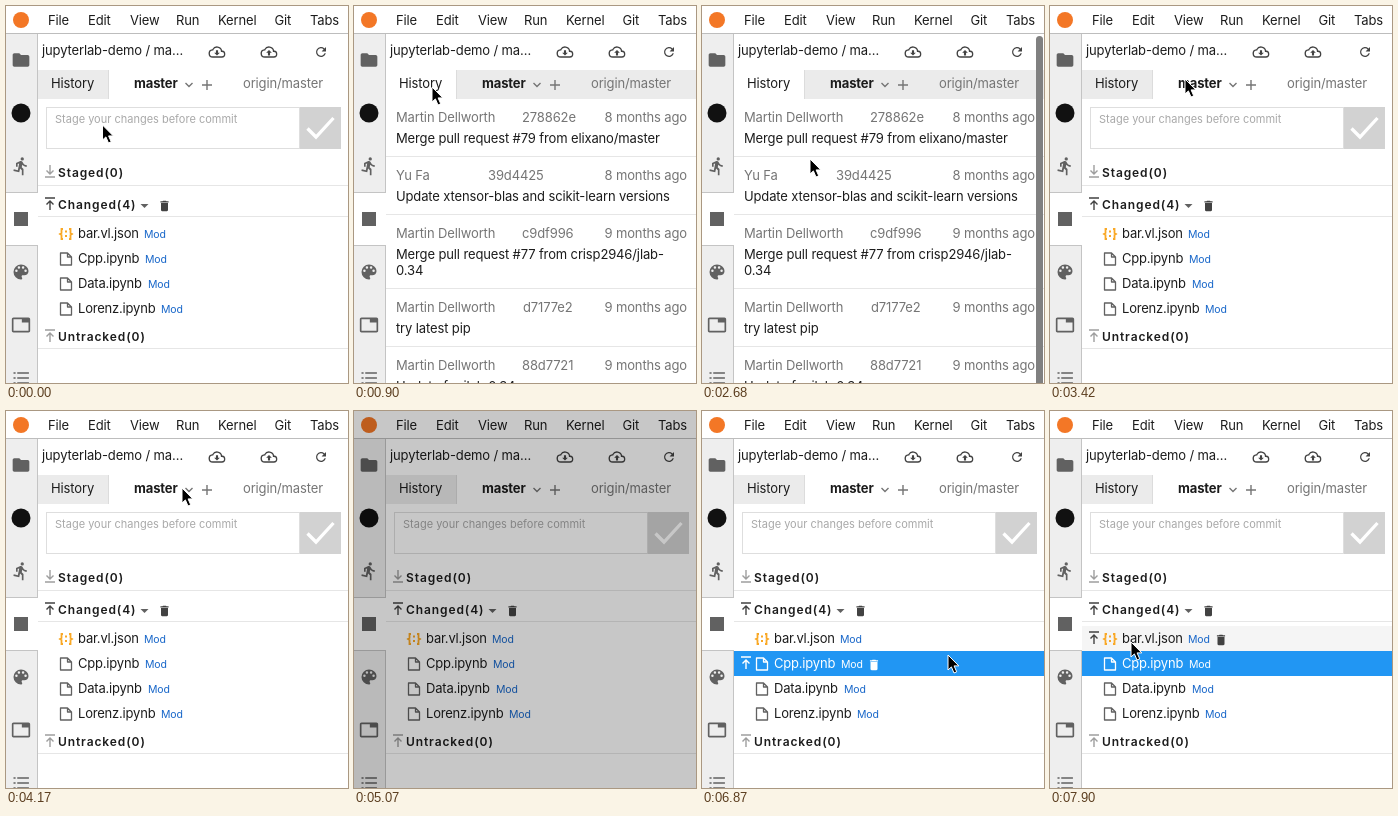
An HTML page that plays this animation: 342x377 px, repeating every 8000 ms.

```html
<!DOCTYPE html>
<html lang="en">
<head>
<meta charset="utf-8">
<title>Version control panel</title>
<style>
  html, body { margin: 0; width: 100%; height: 100%; overflow: hidden; background: #fff; }
  svg { display: block; width: 100vw; height: 100vh; }
  text { font: 13px Inter, "Open Sans", sans-serif; letter-spacing: -.13px; fill: #1c1c1c; white-space: pre; }
  .grey { fill: #757575; }
  .bold { font-weight: 700; }
  .head { font-size: 12px; font-weight: 600; letter-spacing: .9px; }
  .hint { font-size: 11px; letter-spacing: 0; fill: #a9a9a9; }
  .mod { font-size: 10.5px; fill: #1766c9; }
  .name { letter-spacing: -.2px; }
  .bg { fill: #fff; }
  .act { display: none; color: #424242; }
  .hover .bg { fill: #f5f5f5; }
  .hover .act { display: inline; }
  .sel .bg { fill: #2196f3; }
  .sel text { fill: #fff; }
  .sel .doc { stroke: #fff; }
  .sel .act { color: #fff; }
</style>
</head>
<body>
<svg id="stage" viewBox="0 0 342 377" preserveAspectRatio="none"></svg>
<script>
const LOOP = 8000;
const stage = document.getElementById('stage');

const shapes = {
  folder: 'M10 4H4c-1.1 0-2 .9-2 2v12c0 1.1.9 2 2 2h16c1.1 0 2-.9 2-2V8c0-1.1-.9-2-2-2h-8l-2-2z',
  run: 'M13.5 5.5a2 2 0 1 0 0-4a2 2 0 1 0 0 4zM9.9 19.4l1-4.4 2.1 2v6h2v-7.5l-2.1-2 .6-3c1.3 1.5 3.3 2.5 5.5 2.5v-2c-1.9 0-3.5-1-4.3-2.4l-1-1.6c-.4-.6-1-1-1.7-1-.3 0-.5.1-.8.1L6 8.3v4.7h2V9.6l1.8-.7-1.6 8.1-4.9-1-.4 2 7 1.4z',
  palette: 'M12 3a9 9 0 0 0 0 18c.83 0 1.5-.67 1.5-1.5 0-.39-.15-.74-.39-1.01-.23-.26-.38-.61-.38-.99 0-.83.67-1.5 1.5-1.5H16c2.76 0 5-2.24 5-5 0-4.42-4.03-8-9-8z' +
    [[5, 10.5], [8, 6.5], [13, 6.5], [16, 10.5]].map(([x, y]) => `M${x} ${y}a1.5 1.5 0 1 0 3 0a1.5 1.5 0 1 0-3 0z`).join(''),
  tabs: 'M21 3H3c-1.1 0-2 .9-2 2v14c0 1.1.9 2 2 2h18c1.1 0 2-.9 2-2V5c0-1.1-.9-2-2-2zM21 19H3V5h10v4h8z',
  list: [5, 11, 17].map(y => `M3 ${y}h2.5v2h-2.5zM7.5 ${y}h14v2h-14z`).join(''),
  trash: 'M6 19c0 1.1.9 2 2 2h8c1.1 0 2-.9 2-2V7H6zM19 4h-3.5l-1-1h-5l-1 1H5v2h14z',
  refresh: 'M17.65 6.35A8 8 0 1 0 19.73 14h-2.08A6 6 0 1 1 16.22 7.78L13 11h7V4z',
  cloud: 'M19.35 10.04A7.5 7.5 0 0 0 5.35 8.04A6 6 0 0 0 6 20h13a5 5 0 0 0 .35-9.96zM19 18H6a4 4 0 0 1 0-8h.71A5.5 5.5 0 0 1 17.5 11.5v.5H19a3 3 0 0 1 0 6z'
};
const down = 'M10.5 9.5h3V13H16l-4 4-4-4h2.5z';
const up = 'M8 13h2.5v4h3v-4H16l-4-4z';

const text = (x, y, s, cls = '') => `<text x="${x}" y="${y}" class="${cls}">${s}</text>`;
const rect = (x, y, w, h, fill, more = '') => `<rect x="${x}" y="${y}" width="${w}" height="${h}" fill="${fill}" ${more}/>`;
const rule = y => rect(32, y, 310, 1, '#e6e6e6');
const stroke = (d, color, w = 1.3, more = '') => `<path d="${d}" fill="none" stroke="${color}" stroke-width="${w}" ${more}/>`;

// 24-unit icon centred on (cx, cy)
const icon = (d, cx, cy, size, fill = '#616161') =>
  `<path d="${d}" fill="${fill}" fill-rule="evenodd" transform="translate(${cx - size / 2} ${cy - size / 2}) scale(${size / 24})"/>`;

// arrow pointing at a bar; dir 1 is up, -1 is down
const arrow = (cy, color, dir = 1) =>
  `<g transform="translate(44 ${cy}) scale(1 ${dir})">` +
  stroke('M-5-6H5M0 6V-3M-3.5 .5L0-3L3.5 .5', color, 1.4) + '</g>';

const menuBar = () => rect(0, 0, 342, 27, '#fff') + rect(0, 27, 342, 1, '#bdbdbd') +
  '<circle cx="15" cy="14" r="8" fill="#f37726"/>' +
  [[42, 'File'], [82, 'Edit'], [124, 'View'], [170, 'Run'], [212, 'Kernel'], [268.5, 'Git'], [304, 'Tabs']]
    .map(([x, s]) => text(x, 19, s)).join('');

const sideBar = () => rect(0, 28, 32, 349, '#eeeeee') + rect(31, 28, 1, 349, '#c4c4c4') +
  rect(0, 187, 32, 53, '#fff') + rect(0, 186, 32, 1, '#c4c4c4') + rect(0, 239, 32, 1, '#c4c4c4') +
  icon(shapes.folder, 15, 54, 20) +
  '<circle cx="15" cy="107" r="9.5" fill="#111"/>' +
  icon(shapes.run, 15, 160, 20) +
  rect(8, 206, 14, 14, '#616161') +
  icon(shapes.palette, 15, 266, 20) +
  icon(shapes.tabs, 15, 319, 20) +
  icon(shapes.list, 15, 372, 20);

const header = () => text(36, 49, 'jupyterlab-demo / ma…') +
  icon(shapes.cloud + down, 211, 46, 17, '#424242') +
  icon(shapes.cloud + up, 263, 46, 17, '#424242') +
  icon(shapes.refresh, 315, 46, 15, '#424242');

const tabs = () => rect(32, 64, 71, 29, '#ebebeb', 'id="tabLeft"') + rect(103, 64, 239, 29, '#fff', 'id="tabRight"') +
  rect(102, 64, 1, 29, '#dcdcdc') +
  text(45, 82, 'History') + text(128, 82, 'master', 'bold') +
  stroke('M179.5 77L183 80.5L186.5 77', '#757575', 1.4) +
  stroke('M196 79H206M201 74V84', '#757575', 1.4) +
  text(237, 82, 'origin/master', 'grey');

const files = [['bar.vl.json', 138], ['Cpp.ipynb', 139], ['Data.ipynb', 142], ['Lorenz.ipynb', 155]];

const braces = y => stroke(`M57 ${y - 5}h-1.5v4l-1.5 1 1.5 1v4h1.5M63 ${y - 5}h1.5v4l1.5 1-1.5 1v4h-1.5`, '#f9a825', 1.8) +
  rect(59, y - 3.5, 2, 2, '#f9a825') + rect(59, y + 1, 2, 2, '#f9a825');
const sheet = y => stroke(`M54.5 ${y - 6}h7l4 4v8h-11zm7 0v4h4`, '#616161', 1.3, 'class="doc" stroke-linejoin="round"');

const fileRow = ([name, modX], i) => {
  const y = 215 + i * 25;
  return `<g class="row"><rect class="bg" x="32" y="${y}" width="310" height="25"/>` +
    `<g class="act">${arrow(y + 12, 'currentColor')}${icon(shapes.trash, modX + 33, y + 14, 14, 'currentColor')}</g>` +
    (name.endsWith('.json') ? braces : sheet)(y + 13) +
    text(72, y + 17, name, 'name') + text(modX, y + 17, 'Mod', 'mod') + '</g>';
};

const changes = () => rect(40.5, 101.5, 253, 41, '#fff', 'stroke="#dedede"') +
  text(49, 117, 'Stage your changes before commit', 'hint') +
  rect(294, 101, 41, 42, '#d2d2d2') + stroke('M301.5 122.5L310 131L327.5 112', '#fff', 3.3) +
  arrow(165, '#9e9e9e', -1) + text(52, 171, 'Staged(0)', 'head') + rule(179) +
  arrow(198, '#424242') + text(52, 203, 'Changed(4)', 'head') +
  '<path d="M134.5 198h8l-4 4z" fill="#616161"/>' + icon(shapes.trash, 158.5, 200, 14, '#424242') + rule(210) +
  files.map(fileRow).join('') +
  arrow(330, '#9e9e9e') + text(52, 335, 'Untracked(0)', 'head') + rule(342);

const commits = [
  [116, 'Martin Dellworth', 168, '278862e', 8, 'Merge pull request #79 from elixano/master'],
  [174, 'Yu Fa', 134, '39d4425', 8, 'Update xtensor-blas and scikit-learn versions'],
  [232, 'Martin Dellworth', 168, 'c9df996', 9, 'Merge pull request #77 from crisp2946/jlab-', '0.34'],
  [306, 'Martin Dellworth', 169, 'd7177e2', 9, 'try latest pip'],
  [364, 'Martin Dellworth', 168, '88d7721', 9, 'Update for jlab 0.34']
];

const history = () => commits.map(([y, who, x, hash, age, ...lines]) =>
  text(42, y, who, 'grey') + text(x, y, hash, 'grey') +
  `<text x="333" y="${y}" class="grey" text-anchor="end">${age} months ago</text>` +
  lines.map((s, i) => text(42, y + 21 + 16 * i, s)).join('') +
  rule(y + 18 + 16 * lines.length)).join('');

stage.innerHTML =
  '<defs><clipPath id="pane"><rect x="32" y="28" width="310" height="349"/></clipPath></defs>' +
  rect(0, 0, 342, 377, '#fff') +
  `<g clip-path="url(#pane)"><g id="panel">${header()}${tabs()}` +
  `<g id="changes">${changes()}</g><g id="history">${history()}</g></g>` +
  rect(334, 30, 7, 380, '#808080', 'rx="3.5" id="thumb"') + '</g>' +
  sideBar() + menuBar() +
  rect(0, 0, 342, 377, '#000', 'opacity=".22" id="dim"') +
  '<path id="pointer" d="M0 0V15L3.4 11.9L6 18L8.7 16.8L6.1 10.9H10.8Z" fill="#000" stroke="#fff"/>';

const part = {};
stage.querySelectorAll('[id]').forEach(el => part[el.id] = el);
const rows = [...stage.querySelectorAll('.row')];

// pointer positions, each held until the next: [ms, x, y]; no position hides it
const moves = [
  [0, 96.5, 119], [150, 76, 90], [300, 78, 81],
  [1200, 73, 78], [1345, 77, 98], [1490, 90, 122], [1635, 102, 142], [1780, 108, 153],
  [2980, 112, 135], [3130, 122, 105], [3280, 131, 82], [3420, 135, 73],
  [3720, 142, 73], [3870, 156, 75], [4020, 169, 76], [4170, 176, 77],
  [4920, 179, 80], [5070],
  [6420, 327, 269], [6570, 246, 244],
  [7160, 226, 244], [7310, 190, 242], [7460, 150, 238], [7610, 116, 234], [7750, 92, 232], [7900, 81, 231]
];

const show = (el, on) => el.style.display = on ? '' : 'none';
const within = (t, a, b) => t >= a && t < b;

function render(t) {
  const [, x, y] = moves.filter(m => m[0] <= t).pop();
  const log = within(t, 900, 3420);
  const scroll = within(t, 2080, 2680) ? 5 : 0;
  const hovered = !log && y >= 215 ? Math.floor((y - 215) / 25) : -1;

  show(part.history, log);
  show(part.changes, !log);
  part.tabLeft.setAttribute('fill', log ? '#fff' : '#ebebeb');
  part.tabRight.setAttribute('fill', log ? '#ebebeb' : '#fff');
  part.panel.setAttribute('transform', `translate(0 ${-scroll})`);
  part.thumb.setAttribute('y', 30 + scroll * .8);
  show(part.thumb, within(t, 2080, 2980));
  show(part.dim, within(t, 4470, 5970));
  rows.forEach((row, i) => {
    row.classList.toggle('hover', i === hovered);
    row.classList.toggle('sel', i === 1 && t >= 6870);
  });
  show(part.pointer, x !== undefined);
  if (x !== undefined) part.pointer.setAttribute('transform', `translate(${x} ${y})`);
}

const start = performance.now();
function tick() {
  render((performance.now() - start) % LOOP);
  requestAnimationFrame(tick);
}
tick();
</script>
</body>
</html>
```
